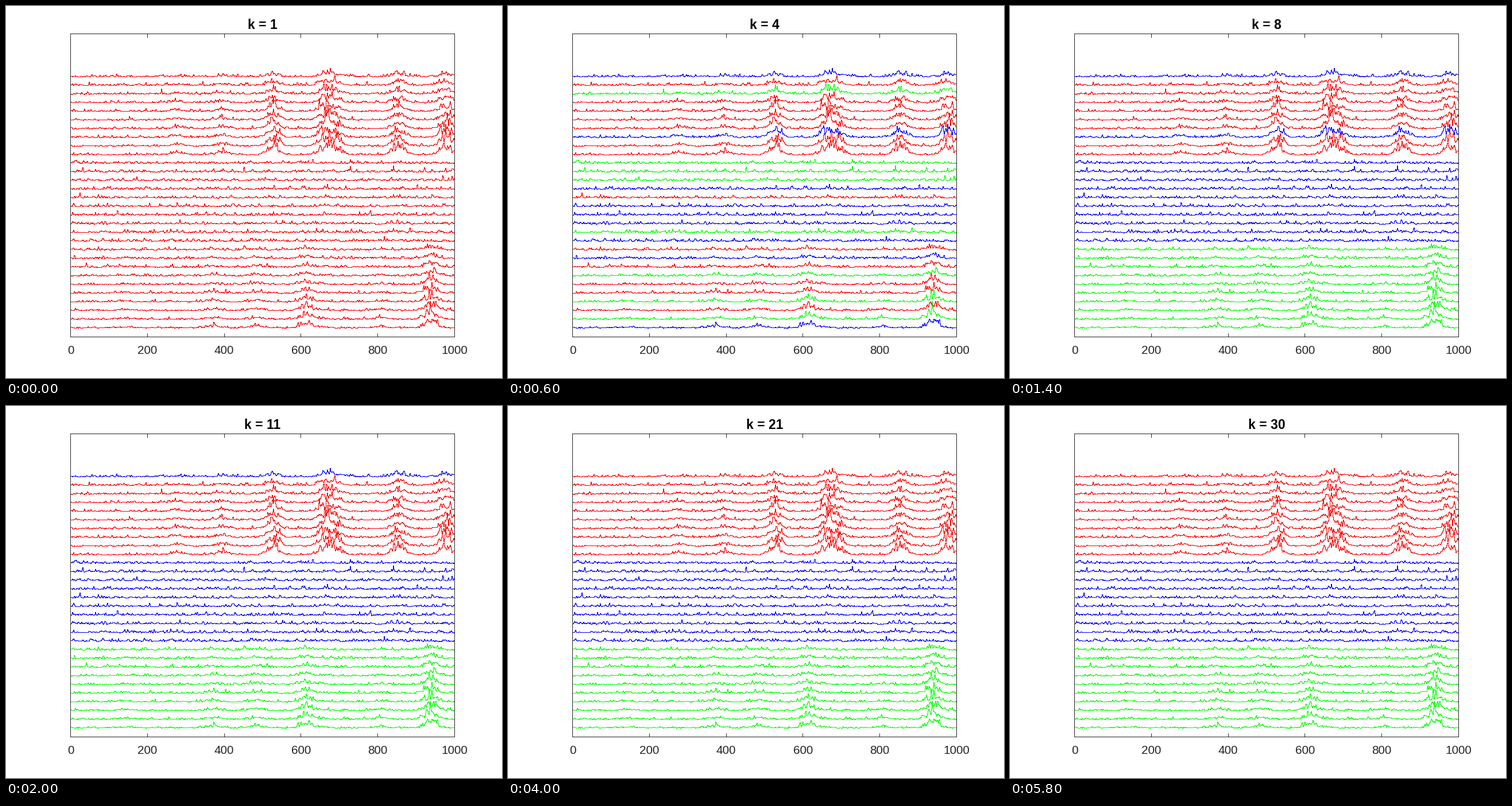
These frames come from a looping animation (864 by 648 pixels, 6 s). A matplotlib script:

```python
import numpy as np
import matplotlib.pyplot as plt
from matplotlib.animation import FuncAnimation

W, H, DPI = 864, 648, 100
LEFT, RIGHT, TOP, BOTTOM = 112, 781, 48, 576
FRAMES, INTERVAL = 30, 200
PX = 72 / DPI
ROW_PX = (BOTTOM - TOP) / 35
INK = "#262626"
COLORS = {"R": "#ff0000", "G": "#00ff00", "B": "#0000ff"}

plt.rcParams["font.family"] = "Liberation Sans"
plt.rcParams["path.simplify"] = False

# Bump centre: height in pixels, one dict per group from the top down
BUMPS = [
    {277: 4, 394: 5, 527: 16, 662: 16, 690: 11, 853: 15, 976: 16},
    {515: 1, 665: 1.3, 846: 1.5},
    {140: 2, 370: 3.5, 482: 4, 610: 9, 650: 2, 805: 2.5, 937: 15},
]

# Rows counted from the top that hold a stray class until an iteration
STRAYS = [("B", [0], 12), ("B", [7], 9), ("G", [11, 12], 8), ("R", [20], 7),
          ("G", [2, 18], 6), ("R", [22, 25], 5), ("R", [14, 24, 27], 6),
          ("G", [10], 5), ("B", [21, 29], 5)]

knots = np.linspace(0, 1000, 420)
columns = np.arange(1, RIGHT - LEFT + 1)
x = columns * 1000 / (RIGHT - LEFT)
rng = np.random.default_rng(7)


def make_row(row):
    """Noisy trace on whole pixels; bumps fade and noise grows upwards."""
    group, rank = divmod(row, 10)
    height = 9 - rank
    bump = sum(h * np.exp(-((knots - c) / 15) ** 2 / 2)
               for c, h in BUMPS[group].items())
    fade = 1 - 0.07 * height
    floor = 1.9 if group == 1 else 1.1 + 0.07 * height
    y = floor * rng.gamma(1.5, 1 / 1.5, knots.size)
    y += fade * bump * rng.gamma(5, 1 / 5, knots.size)
    pixels = (30 - row) * ROW_PX + np.interp(x, knots, y)
    return np.round(pixels) / ROW_PX


def row_class(row, k):
    if k == 1:
        return "R"
    for name, rows, settled in STRAYS:
        if row in rows and k < settled:
            return name
    # The third group first shows as a mix of green and red
    return "RBG"[row // 10]


fig = plt.figure(figsize=(W / DPI, H / DPI), dpi=DPI, facecolor="white")
ax = fig.add_axes([LEFT / W, 1 - BOTTOM / H,
                   (RIGHT - LEFT) / W, (BOTTOM - TOP) / H])
ax.set(xlim=(0, 1000), ylim=(0, 35), xticks=range(0, 1001, 200), yticks=[])
ax.tick_params(direction="in", top=True, length=6.5 * PX, width=PX,
               color=INK, labelbottom=False)
for spine in ax.spines.values():
    spine.set(linewidth=PX, color=INK)


def label(px, py, text, size, **style):
    return fig.text(px / W, 1 - py / H, text, fontsize=size * PX,
                    ha="center", va="baseline", **style)


for tick in range(0, 1001, 200):
    label(LEFT + 0.5 + (RIGHT - LEFT) * tick / 1000, 606, str(tick), 20.8,
          color=INK)
title = label((LEFT + RIGHT + 1) / 2, 40, "", 22.9, color="black",
              weight="bold")

lines = [ax.plot(x, make_row(row), lw=PX, antialiased=False, snap=True,
                 drawstyle="steps-post", solid_joinstyle="miter",
                 solid_capstyle="butt", clip_on=False, zorder=2 - row / 100)[0]
         for row in range(30)]


def draw(i):
    k = i + 1
    title.set_text(f"k = {k}")
    for row, line in enumerate(lines):
        line.set_color(COLORS[row_class(row, k)])
    return [title, *lines]


anim = FuncAnimation(fig, draw, frames=FRAMES, interval=INTERVAL,
                     repeat=True, repeat_delay=0, blit=False)
plt.show()
```
